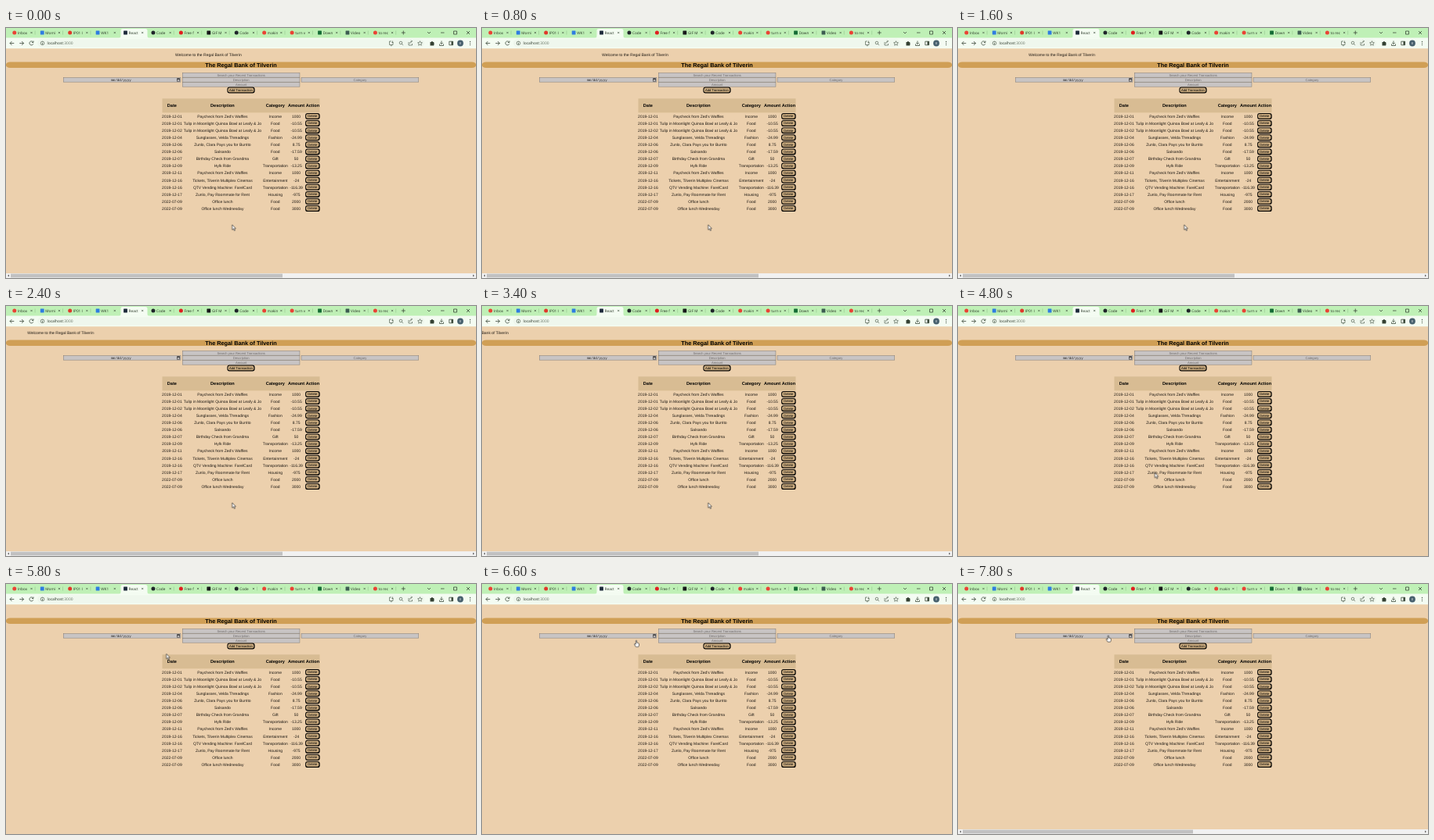
Animation, 600 px wide and 320 px high, one loop 8000 ms. Source, as an HTML page:

```html
<!DOCTYPE html>
<html lang="en">
<head>
<meta charset="utf-8">
<title>Bank ledger</title>
<style>
  html, body { margin: 0; width: 100%; height: 100%; overflow: hidden; background: #ecd0ad; }
  svg { display: block; width: 100vw; height: 100vh; }
  text { font: 5px "Liberation Sans", Arial, sans-serif; fill: #1c1712; text-rendering: geometricPrecision; white-space: pre; }
  .mid { text-anchor: middle; }
  .head { font-size: 5.6px; font-weight: bold; fill: #000; }
  .title { font-size: 7.3px; font-weight: bold; fill: #000; }
  .small { font-size: 4.17px; fill: #000; }
  .hint { font-size: 4.17px; fill: #6d6a69; }
  .mono { font: 4.3px "Liberation Mono", monospace; fill: #222; }
  .ui { font: 4.7px "Open Sans", "Noto Sans", sans-serif; fill: #263324; }
  .line { fill: none; stroke: #3c4a3a; stroke-width: .8; }

  .marquee, .cursor, .arrow, .hand, .bar, .bar2 { animation: 8s infinite; }
  .marquee { animation-name: drift; animation-timing-function: steps(40); }
  .cursor { animation-name: roam; }
  .arrow { animation-name: arrow; animation-timing-function: step-end; }
  .hand { animation-name: hand; animation-timing-function: step-end; }
  .bar { animation-name: bar; animation-timing-function: step-end; }
  .bar2 { animation-name: bar2; animation-timing-function: step-end; }

  @keyframes drift {
    from { transform: translateX(216px); }
    to { transform: translateX(-412.8px); }
  }
  @keyframes roam {
    0%, 45% { transform: translate(288.7px, 251.8px); animation-timing-function: steps(6); }
    60% { transform: translate(251.2px, 213.4px); animation-timing-function: steps(3); }
    67.5% { transform: translate(216px, 118px); animation-timing-function: steps(3); }
    75% { transform: translate(199px, 75px); animation-timing-function: steps(3); }
    82.5% { transform: translate(197px, 72.2px); animation-timing-function: steps(6); }
    97.5%, 100% { transform: translate(191.8px, 65.9px); }
  }
  @keyframes arrow { 0% { opacity: 1; } 75%, 100% { opacity: 0; } }
  @keyframes hand { 0% { opacity: 0; } 75%, 100% { opacity: 1; } }
  @keyframes bar { 0% { opacity: 1; } 50%, 100% { opacity: 0; } }
  @keyframes bar2 { 0% { opacity: 0; } 90%, 100% { opacity: 1; } }
</style>
</head>
<body>
<svg id="stage" viewBox="0 0 600 320" preserveAspectRatio="none"></svg>
<script>
const chrome = '#f4fcf2';
const parts = [];
const add = markup => parts.push(markup);
const rect = (x, y, w, h, fill, extra = '') =>
  add(`<rect x="${x}" y="${y}" width="${w}" height="${h}" fill="${fill}" ${extra}/>`);
const text = (x, y, content, cls = '') =>
  add(`<text x="${x}" y="${y}" class="${cls}">${content.replace(/&/g, '&amp;')}</text>`);
const line = (d, extra = '') => add(`<path class="line" d="${d}" ${extra}/>`);
const dot = (x, y, r, fill) => add(`<circle cx="${x}" cy="${y}" r="${r}" fill="${fill}"/>`);

const tabs = [
  ['Inbox', '#ea4335'], ['Morni', '#2f7de1', 1], ['IP01 I', '#e0392b'], ['WK1', '#2f7de1', 1],
  ['React', '#1d2a3a', 1], ['Code', '#20252b'], ['Free f', '#e02020'], ['GIF M', '#17181a', 1],
  ['Code', '#20252b'], ['makin', '#ea4335'], ['turn v', '#ea4335'], ['Down', '#146c35', 1],
  ['Video', '#3d5c52', 1], ['to rec', '#ea4335']
];
const rows = [
  ['2019-12-01', "Paycheck from Zed's Waffles", 'Income', '1000'],
  ['2019-12-01', 'Tulip in Moonlight Quinoa Bowl at Leafy & Jo', 'Food', '-10.55'],
  ['2019-12-02', 'Tulip in Moonlight Quinoa Bowl at Leafy & Jo', 'Food', '-10.55'],
  ['2019-12-04', 'Sunglasses, Velda Threadings', 'Fashion', '-24.99'],
  ['2019-12-06', 'Zunlo, Clara Pays you for Burrito', 'Food', '8.75'],
  ['2019-12-06', 'Salsando', 'Food', '-17.59'],
  ['2019-12-07', 'Birthday Check from Grandma', 'Gift', '50'],
  ['2019-12-09', 'Hylk Ride', 'Transportation', '-13.25'],
  ['2019-12-11', "Paycheck from Zed's Waffles", 'Income', '1000'],
  ['2019-12-16', 'Tickets, Tilverin Multiplex Cinemas', 'Entertainment', '-24'],
  ['2019-12-16', 'QTV Vending Machine: FarelCard', 'Transportation', '-116.39'],
  ['2019-12-17', 'Zunlo, Pay Roommate for Rent', 'Housing', '-975'],
  ['2022-07-09', 'Office lunch', 'Food', '2000'],
  ['2022-07-09', 'Office lunch Wednesday', 'Food', '3000']
];
const columns = [211.9, 276.4, 343.8, 370.6, 391.4];

function drawTabs() {
  rect(0, 0, 600, 14, '#bff0b6');
  add(`<path d="M144 13Q146.500 13 146.500 10V3.500Q146.500 1 149 1H178Q180.500 1 180.500 3.500V10Q180.500 13 183 13Z" fill="${chrome}"/>`);
  tabs.forEach(([label, color, square], i) => {
    const x = 10.8 + i * 35.43;
    if (square) rect(x - 2.4, 3.6, 4.8, 4.8, color, 'rx=".4"');
    else dot(x, 6, 2.5, color);
    text(x + 4.1, 7.7, label, 'ui');
    line(`M${x + 20.6} 4.900l2.200 2.200m0-2.200l-2.200 2.200`, 'style="stroke-width:.6"');
    if (i !== 3 && i !== 4) line(`M${x + 26.3} 3.500v5`, 'style="stroke:#7fae79;stroke-width:.4"');
  });
  line('M504.800 6h5m-2.500-2.500v5');
  line('M538 5l2 2 2-2M555 6h4.500M571.500 4h4v4h-4zM588 4l4 4m0-4l-4 4');
}

function drawToolbar() {
  rect(0, 12.5, 600, 13.7, chrome);
  rect(40, 14.2, 494, 10.4, '#eff7ed', 'rx="5.2"');
  line('M10.300 19.500H5m2.500-2.500L5 19.500 7.500 22M17.300 19.500h5.300m-2.500-2.500l2.500 2.500-2.500 2.500');
  line('M34.500 18a2.500 2.500 0 1 0 .3 2.300M35 16.500v2h-2');
  line('M46.500 19.200v1.800M46.500 17.600v.7');
  add('<circle class="line" cx="46.500" cy="19.400" r="2.300" style="stroke-width:.6"/>');
  add('<text x="52.500" y="21.200" class="ui" style="font-size:4.9px">localhost<tspan fill="#687666">:3000</tspan></text>');
  line('M494 18.500v3h-4.500v-4.500h2.500M490.800 22.700h2M493.500 16.500v2.500m-1-1l1 1 1-1', 'style="stroke-width:.6"');
  add('<circle class="line" cx="504" cy="19" r="1.800" style="stroke-width:.6"/>');
  line('M505.300 20.300l1.800 1.800M514 18v4h4.500v-2M515.500 20q.2-3 3-3m-1.300-1.300l1.300 1.300-1.300 1.300', 'style="stroke-width:.6"');
  line('M528.500 16.700l.9 1.900 2 .2-1.500 1.400.4 2-1.800-1-1.800 1 .4-2-1.500-1.400 2-.2z', 'style="stroke-width:.6"');
  add('<path d="M541.500 18h1.400a1 1 0 0 1 2 0h1.400v1.500a1 1 0 0 1 0 1.600v1.400h-4.800z" fill="#344132"/>');
  line('M556 16.500v4m-1.800-1.700l1.800 1.800 1.800-1.800M553.500 20.500v2h5v-2');
  line('M565.800 17.200h4.800v4.600h-4.800z');
  rect(568.5, 17.2, 2.1, 4.6, '#344132');
  dot(580, 19.5, 3.9, '#47606d');
  add('<text x="580" y="21" class="ui mid" style="fill:#fff;font-size:4px">E</text>');
  [17.4, 19.5, 21.6].forEach(y => dot(592.5, y, .6, '#344132'));
}

function field(x, y, label) {
  rect(x + .25, y + .25, 149.7, 5.5, '#c8c4c4', 'stroke="#7d7876" stroke-width=".5"');
  if (label) text(x + 75.2, y + 4.4, label, 'hint mid');
}

function button(x, y, w, label) {
  rect(x, y - 4, w, 8, '#080604', 'rx="2.9"');
  rect(x + 1, y - 3, w - 2.3, 5.7, '#c9aa7e', 'rx="2"');
  text(x + w / 2 - .1, y + 1.4, label, 'small mid');
}

function drawForm() {
  rect(0, 43.5, 600, 7.5, '#d09f55', 'rx="5" ry="3.2"');
  text(300, 49.6, 'The Regal Bank of Tilverin', 'title mid');
  field(225, 57.4, 'Search your Recent Transactions');
  field(73, 63.4);
  text(134, 67.9, 'mm/dd/yyyy', 'mono');
  rect(218.6, 64.9, 3.2, 3.2, 'none', 'stroke="#111" stroke-width=".5"');
  rect(218.6, 64.7, 3.2, 1, '#111');
  field(225, 63.4, 'Description');
  field(376.8, 63.4, 'Category');
  field(225, 69.4, 'Amount');
  button(282.4, 79.5, 35.2, 'Add Transaction');
}

function drawTable() {
  rect(199.5, 90.3, 201, 18, '#d8bc93');
  ['Date', 'Description', 'Category', 'Amount', 'Action']
    .forEach((label, i) => text(columns[i], 101.2, label, 'head mid'));
  rows.forEach((row, r) => {
    const y = 113 + r * 9.08;
    row.forEach((cell, i) => text(columns[i], y + 1.8, cell, 'mid'));
    button(382.1, y, 18.6, 'Delete');
  });
}

function scrollbar(cls, width) {
  add(`<g class="${cls}">`);
  rect(0, 314, 600, 6, '#f1f1f1');
  rect(6, 314.6, width, 4.8, '#c1c1c1');
  add('<path d="M4 315.500v3L2 317zM596 315.500v3l2-1.500z" fill="#666"/></g>');
}

function drawCursor() {
  add('<g class="cursor" stroke="#111" stroke-width=".6" fill="#fff" stroke-linejoin="round">');
  add('<path class="arrow" d="M0 0V6.500l1.500-1.400 1.100 2.600 1.100-.5-1.100-2.400h2z"/>');
  add('<path class="hand" d="M-.7 5V.7Q-.7 0 0 0T.7.700V3l2 .5q.8.300.8 1V6.500L2.700 8.200H-.6L-2.500 5.300q-.4-.8.300-1z"/></g>');
}

rect(0, 26, 600, 294, '#ecd0ad');
drawTabs();
drawToolbar();
drawForm();
add('<g class="marquee">');
text(0, 36, 'Welcome to the Regal Bank of Tilverin');
add('</g>');
drawTable();
scrollbar('bar', 347);
scrollbar('bar2', 294);
drawCursor();
document.getElementById('stage').innerHTML = parts.join('');
</script>
</body>
</html>
```
